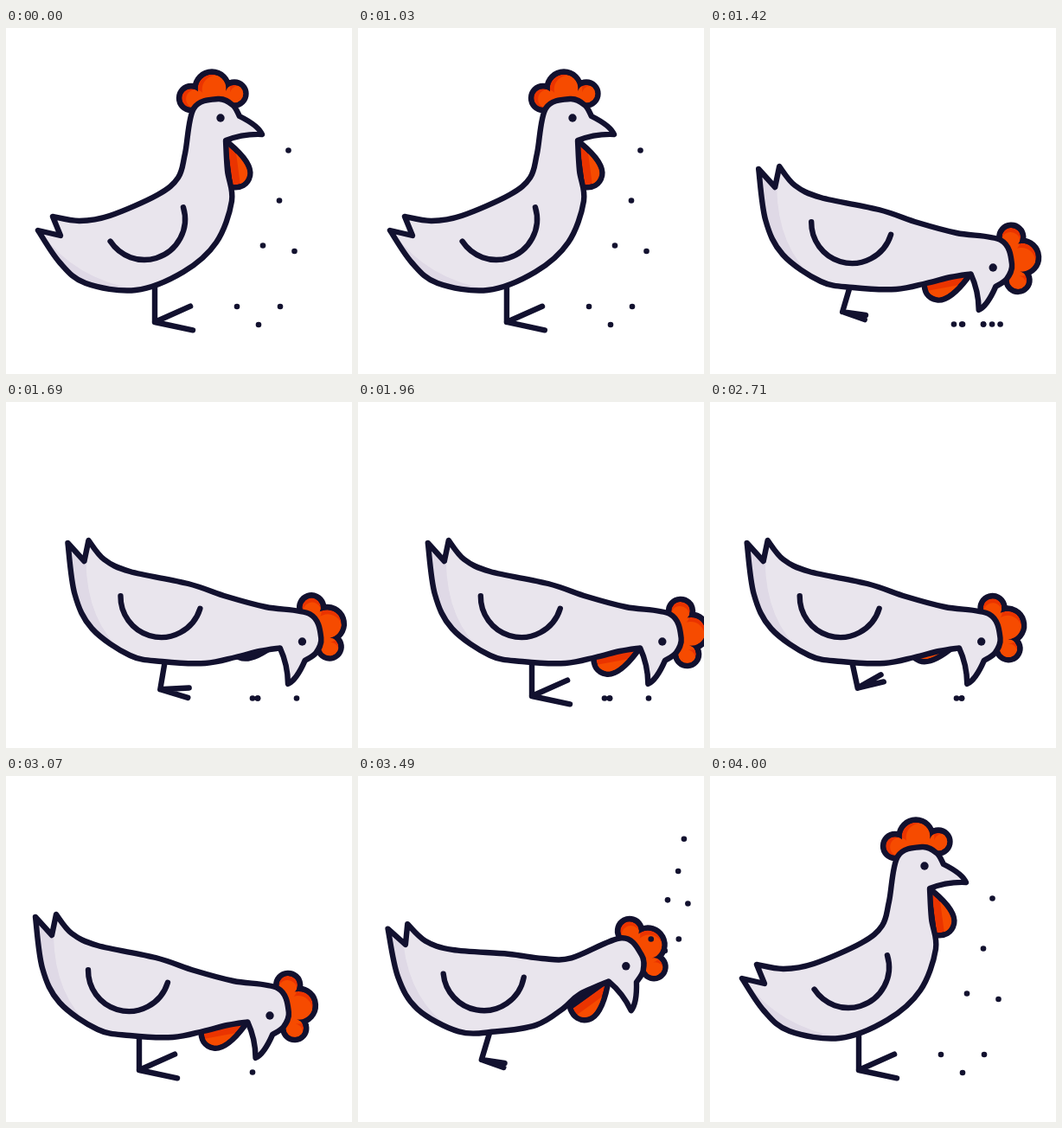
These frames come from a looping animation (400x400 px, 4030 ms). An HTML page with a canvas:

```html
<!DOCTYPE html>
<html lang="en">
<head>
<meta charset="utf-8">
<title>Pecking hen</title>
<style>
html, body { margin: 0; width: 100%; height: 100%; overflow: hidden; background: #fff; }
canvas { display: block; width: 100vw; height: 100vh; }
</style>
</head>
<body>
<canvas id="stage" width="400" height="400"></canvas>
<script>
const ctx = document.getElementById('stage').getContext('2d');
const LOOP = 4030, LINE = 6.4;
const INK = '#12112f', BODY = '#e9e5ed', SHADE = '#dfd9e6', RED = '#f64b00', DARK_RED = '#ea3400';

// Key points as standing x, y and pecking x, y.
const BACK = [
  [54,218, 80,160], [85,223, 98,182], [120,217, 128,196],
  [175,193, 195,210], [199,173, 240,225], [207,145, 285,237]
];
const BELLY = [
  [256,165, 278,288], [261,200, 250,295], [243,248, 215,302], [205,282, 165,300],
  [150,303, 128,293], [92,295, 84,262], [62,271, 64,222], [37,234, 56,163]
];
const NOTCH = [63,240, 75,184];
const SHADE_EDGE = [[42,238, 77,184], [80,290, 78,255], [150,302, 122,291]];
const EYE = [248,104, 327,277];
const WING = [160,221, 164,225];

// Measured from the eye.
const CROWN = [[-31,-11], [-3,-22], [14,-15], [22,-2]];
const LOBES = [[-34,-23,10.8], [-10,-34,16.3], [16,-28,10.3], [-8,-16,20.8]];

// Grain: x, y in the air and x on the ground.
const GRAIN = [[326.5,141.5,326], [316,199.5,316], [297,251.5,291], [333.5,258,336],
  [267,322,285], [317,322,316], [292,343,291]];

// Steps: start, end, from x, to x.
const STEPS = [[1030,1880,172,201], [2110,2950,201,154], [3200,3800,154,172]];

const clamp = v => Math.max(0, Math.min(1, v));
const ease = v => (v = clamp(v), v * v * (3 - 2 * v));
const lerp = (a, b, k) => a + (b - a) * k;
const rad = deg => deg * Math.PI / 180;

// How far the hen has walked, right and then back left.
const walkRight = t => -10 + 35 * ease((t - 1100) / 900);
const walk = t => walkRight(t) - 47 * ease((t - 2080) / 870);

// Smooth curve through points, continuing the path.
function spline(path, pts) {
  path.lineTo(...pts[0]);
  for (let i = 0; i < pts.length - 1; i++) {
    const b = pts[i], c = pts[i + 1], a = pts[i - 1] || b, d = pts[i + 2] || c;
    path.bezierCurveTo(b[0] + (c[0] - a[0]) / 6, b[1] + (c[1] - a[1]) / 6,
      c[0] - (d[0] - b[0]) / 6, c[1] - (d[1] - b[1]) / 6, ...c);
  }
}

function fill(path, color) {
  ctx.fillStyle = color;
  ctx.fill(path);
}

function dot(x, y, r) {
  const path = new Path2D();
  path.arc(x, y, r, 0, 7);
  fill(path, INK);
}

function combPath() {
  const path = new Path2D();
  for (const [x, y, r] of LOBES) {
    path.moveTo(x + r, y);
    path.arc(x, y, r, 0, 2 * Math.PI);
  }
  return path;
}

const COMB = combPath();
const WATTLE = new Path2D('M8 32 C20 42 33 56 31 66 C29 75 22 78 14 77 Z');

// Outlined red part with a dark rim on its left side.
function redPart(path, eye, angle, rim) {
  ctx.save();
  ctx.translate(...eye);
  ctx.rotate(angle);
  ctx.lineWidth = 2 * LINE;
  ctx.stroke(path);
  ctx.clip(path);
  fill(path, DARK_RED);
  ctx.translate(rim, 1);
  fill(path, RED);
  ctx.restore();
}

function drawLeg(t) {
  const [start, end, from, to] = STEPS.findLast(s => t >= s[0]) || STEPS[0];
  const p = clamp((t - start) / (end - start)), lift = Math.sin(Math.PI * p);
  const dir = Math.sign(to - from), windUp = 0.85 * Math.max(0, to - from) * lift;
  const x = lerp(from, to, ease(p) ** 2) - windUp, y = 340 - 12 * lift;

  ctx.beginPath();
  ctx.moveTo(x + 9 * dir * lift, 298);
  ctx.lineTo(x, y);
  for (const side of [-1, 1]) {
    const angle = rad(-6 + 18 * side * (1 - 0.7 * lift) + 20 * dir * lift);
    const length = 45 * (1 - 0.4 * lift);
    ctx.moveTo(x, y);
    ctx.lineTo(x + length * Math.cos(angle), y + length * Math.sin(angle));
  }
  ctx.stroke();
}

function drawHen(t) {
  const bend = ease((t - 1030) / 370) - ease((t - 3300) / 680);
  const tilt = bend ** 1.6;
  const dx = walk(t), angle = rad(87 * tilt);
  const point = (p, k = bend) => [lerp(p[0], p[2] + dx, k), lerp(p[1], p[3], k)];

  // The head swings along an arc.
  const arc = Math.sin(Math.PI * tilt), eye = point(EYE, tilt);
  eye[0] += 27 * arc;
  eye[1] -= 9 * arc;
  const cos = Math.cos(angle), sin = Math.sin(angle);
  const head = ([x, y]) => [eye[0] + x * cos - y * sin, eye[1] + x * sin + y * cos];

  const flop = t > 1405 && t < 3070 ? rad(16) * Math.sin(Math.PI * (t - 1960) / 555) ** 2 : 0;
  redPart(COMB, eye, angle - flop, 5);
  redPart(WATTLE, eye, angle + flop, 9);

  // Points nearer the head follow the head's timing.
  const back = BACK.map((p, i) => point(p, lerp(bend, tilt, i / (BACK.length - 1))));
  const belly = BELLY.map((p, i) => point(p, lerp(tilt, bend, i / (BELLY.length - 1))));
  const body = new Path2D();
  body.moveTo(...back[0]);
  spline(body, [...back, ...CROWN.map(head)]);
  body.quadraticCurveTo(...head([44, 9]), ...head([48, 19]));
  body.quadraticCurveTo(...head([26, 18]), ...head([6, 26]));
  spline(body, [head([6, 26]), ...belly]);
  body.lineTo(...point(NOTCH));
  body.closePath();
  fill(body, BODY);

  const [top, mid, low] = SHADE_EDGE.map(p => point(p));
  const shade = new Path2D();
  shade.moveTo(...top);
  shade.quadraticCurveTo(...mid, ...low);
  shade.lineTo(low[0], 400);
  shade.lineTo(0, 400);
  shade.lineTo(0, top[1] - 60);
  ctx.save();
  ctx.clip(body);
  fill(shade, SHADE);
  ctx.restore();
  ctx.stroke(body);

  const turn = 34 * bend - 17;
  ctx.beginPath();
  ctx.arc(...point(WING), 47, rad(turn), rad(turn + 164));
  ctx.stroke();
  dot(...eye, 4.7);
}

function drawGrain(t) {
  const thrown = t > 3200, turned = t > 2080, beak = 312 + walk(t);
  const spread = Math.min(1, 0.64 + (t - 3490) * 0.00124);
  const drop = clamp((t - 1030) / 320) ** 2, slide = clamp((t - 1030) / 470);
  for (const [x, y, ground] of GRAIN) {
    const eaten = ground > 300 ? turned || beak > ground + 0.9 : turned && beak < ground;
    if (thrown) dot(lerp(467, x, spread), lerp(-50, y, spread), 3.3);
    else if (!eaten) dot(lerp(x, ground, slide), lerp(y, 342.5, drop), 3.3);
  }
}

function frame(now) {
  const t = now % LOOP;
  ctx.fillStyle = '#fff';
  ctx.fillRect(0, 0, 400, 400);
  ctx.strokeStyle = INK;
  ctx.lineWidth = LINE;
  ctx.lineCap = ctx.lineJoin = 'round';
  drawLeg(t);
  drawHen(t);
  drawGrain(t);
  requestAnimationFrame(frame);
}
requestAnimationFrame(frame);
</script>
</body>
</html>
```
